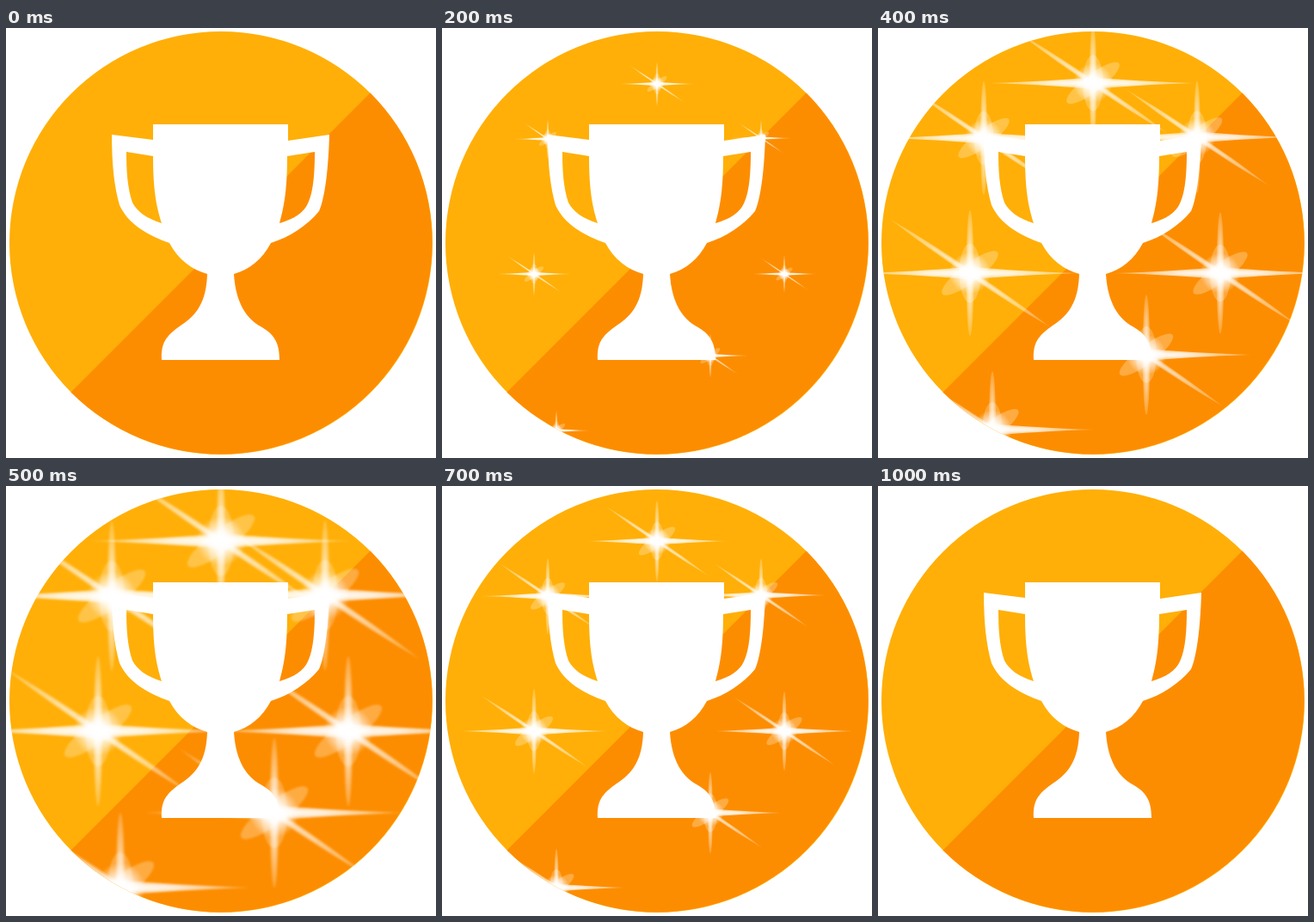
Recreate the animation shown at these times as an HTML page. Size 500 px wide and 500 px high, loop 1.1 s.

```html
<!DOCTYPE html>
<html lang="en">
<head>
<meta charset="utf-8">
<title>Sparkling trophy</title>
<style>
  html, body { margin: 0; width: 100%; height: 100%; overflow: hidden; background: #fff; }
  svg { display: block; width: 100vw; height: 100vh; }
</style>
</head>
<body>
<svg viewBox="0 0 500 500">
  <defs>
    <clipPath id="disc"><circle cx="250" cy="250" r="246"/></clipPath>
    <radialGradient id="ray">
      <stop offset="0" stop-color="#fff"/>
      <stop offset=".4" stop-color="#fff" stop-opacity=".85"/>
      <stop offset="1" stop-color="#fff" stop-opacity=".25"/>
    </radialGradient>
    <radialGradient id="glow">
      <stop offset="0" stop-color="#fff"/>
      <stop offset=".35" stop-color="#fff" stop-opacity=".9"/>
      <stop offset="1" stop-color="#fff" stop-opacity="0"/>
    </radialGradient>
    <filter id="soft" x="-10%" y="-10%" width="120%" height="120%">
      <feGaussianBlur stdDeviation=".8"/>
    </filter>
    <!-- One sparkle at full size, centred on the origin -->
    <g id="star" fill="#fff" filter="url(#soft)">
      <ellipse rx="15" ry="41" opacity=".24"/>
      <ellipse rx="48" ry="13" opacity=".26" transform="rotate(-37)"/>
      <path d="M-133 0Q0-9 133 0Q0 9-133 0Z" fill="url(#ray)" opacity=".75" transform="rotate(34)"/>
      <ellipse rx="5.5" ry="87" fill="url(#ray)" opacity=".75"/>
      <path d="M-151 0Q-60-3 0-9Q60-3 151 0Q60 3 0 9Q-60 3-151 0Z" fill="url(#ray)"/>
      <circle r="29" fill="url(#glow)"/>
    </g>
  </defs>
  <circle cx="250" cy="250" r="246" fill="#ffaf07"/>
  <path d="M423.5 75.5A246 246 0 0 1 75.5 423.5Z" fill="#fd8d00"/>
  <g id="stars" clip-path="url(#disc)"></g>
  <path fill="#fff" fill-rule="evenodd" d="M171 112H328V131L376 124C375 162 371 198 364 213
    C350 230 330 243 308 250C298 269 283 281 265 286C267 320 280 338 296 347
    C312 356 318 366 318 386H181C180 366 186 358 203 346C222 334 233 318 234 286
    C216 281 200 269 190 250C165 241 142 228 132 206C126 185 123 160 123 124L171 130Z
    M140 144L171 149C171 185 174 205 181 227C163 221 153 214 147 203C141 185 140 165 140 144Z
    M359 144L327 149C327 185 324 206 318 227C335 222 346 215 351 204C358 190 359 165 359 144Z"/>
</svg>
<script>
  const STEP = 100, STEPS = 11;
  // x, y, scale when small, scale when large
  const spots = [
    [250, 64, .29, .79], [123, 128, .26, .76], [371, 127, .235, .75],
    [107, 285, .285, .84], [398, 285, .245, .81], [312, 380, .29, .8],
    [133, 467, .26, .78]
  ];
  const layer = document.getElementById('stars');
  const stars = spots.map(() => {
    const use = document.createElementNS('http://www.w3.org/2000/svg', 'use');
    use.setAttribute('href', '#star');
    return layer.appendChild(use);
  });

  function draw() {
    const step = Math.floor(performance.now() / STEP) % STEPS;
    const level = Math.min(step, STEPS - 1 - step);
    spots.forEach(([x, y, small, large], i) => {
      const scale = [0, small * .3, small, (small + large) / 2, large, 1][level];
      const drop = level < 3 ? 1 : 0;
      stars[i].setAttribute('transform', `translate(${x} ${y + drop}) scale(${scale})`);
      stars[i].setAttribute('visibility', level ? 'visible' : 'hidden');
    });
    requestAnimationFrame(draw);
  }
  draw();
</script>
</body>
</html>
```
